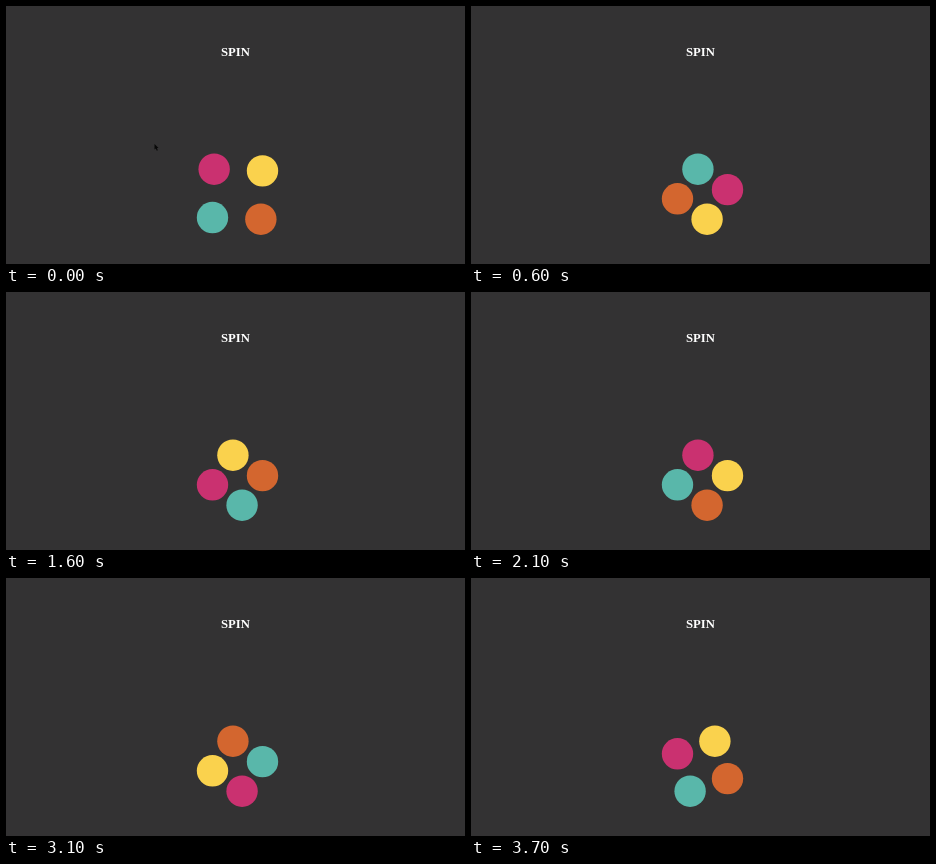
Write an HTML page with a canvas that moves like this. It is 459 px wide and 258 px high and loops after 3800 ms.

```html
<!DOCTYPE html>
<html lang="en">
<head>
<meta charset="utf-8">
<title>Spin</title>
<style>
  html, body { margin: 0; width: 100%; height: 100%; overflow: hidden; background: #333233; }
  canvas { position: absolute; left: 0; top: 0; width: 459px; height: 258px; }
  h1 {
    position: absolute; left: 0; top: 39px; width: 459px; margin: 0;
    font: bold 12.7px/14px "Liberation Serif", "Times New Roman", serif;
    color: #fff; text-align: center;
  }
</style>
</head>
<body>
<canvas id="stage" width="459" height="258"></canvas>
<h1>SPIN</h1>
<script>
const ctx = document.getElementById('stage').getContext('2d');
const LOOP = 3800, STEP = 100;
const SIDE_MS = 500, LEAD_MS = 25;
const LEFT = 206.5, TOP = 163.2, SIDE = 50, RADIUS = 15.7;
const COLORS = ['#ca3170', '#fad24d', '#d3662f', '#59b7aa'];

// cubic-bezier(.25, .1, .25, 1)
const bezier = (a, b, u) => 3 * a * u * (1 - u) ** 2 + 3 * b * u * u * (1 - u) + u ** 3;
function ease(x) {
  let lo = 0, hi = 1;
  for (let i = 0; i < 24; i++) {
    const mid = (lo + hi) / 2;
    if (bezier(0.25, 0.25, mid) < x) lo = mid; else hi = mid;
  }
  return bezier(0.1, 1, lo);
}

// Point on the square, clockwise from the top left corner
function onSquare(edge, p) {
  const d = p * SIDE;
  switch (edge % 4) {
    case 0: return [LEFT + d, TOP];
    case 1: return [LEFT + SIDE, TOP + d];
    case 2: return [LEFT + SIDE - d, TOP + SIDE];
    default: return [LEFT, TOP + SIDE - d];
  }
}

function drawDots(t) {
  const turns = (t + LEAD_MS) / SIDE_MS;
  const edge = Math.floor(turns);
  const p = ease(turns - edge);
  COLORS.forEach((color, i) => {
    const [x, y] = onSquare(edge + i, p);
    ctx.fillStyle = color;
    ctx.beginPath();
    ctx.arc(x, y, RADIUS, 0, 2 * Math.PI);
    ctx.fill();
  });
}

// The pointer slides up and left, then hides
function drawPointer(t) {
  if (t >= 500) return;
  const p = ease(t / 400);
  ctx.save();
  ctx.translate(148.5 - 91 * p, 138 - 38.5 * p);
  ctx.fillStyle = '#080808';
  ctx.beginPath();
  [[0, 0], [0, 5.6], [1.3, 4.5], [2.3, 6.7], [3.3, 6.2], [2.4, 4.1], [4, 4]]
    .forEach(([x, y]) => ctx.lineTo(x, y));
  ctx.fill();
  ctx.restore();
}

const start = performance.now();
function render() {
  const elapsed = Math.max(0, performance.now() - start) % LOOP;
  const t = Math.floor(elapsed / STEP) * STEP;
  ctx.clearRect(0, 0, 459, 258);
  drawDots(t);
  drawPointer(t);
  requestAnimationFrame(render);
}
render();
</script>
</body>
</html>
```
